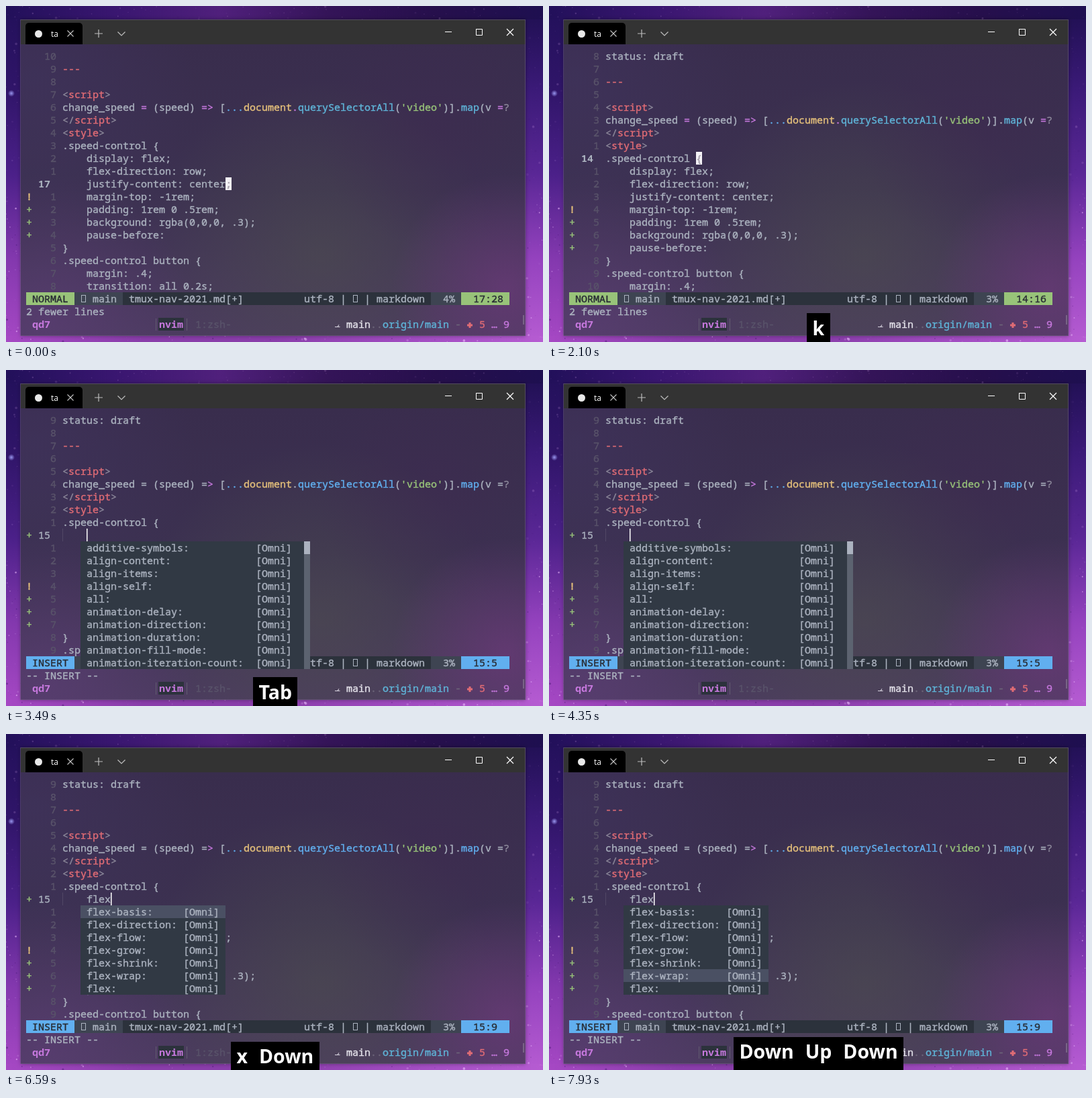
These frames come from a looping animation (800x500 px, 8 s). An HTML page with a canvas:

```html
<!DOCTYPE html>
<html lang="en">
<head>
<meta charset="utf-8">
<title>Editor completion menu</title>
<style>
  html, body { margin: 0; width: 100%; height: 100%; overflow: hidden; background: #3a1d66; }
  canvas { display: block; width: 800px; height: 500px; }
</style>
</head>
<body>
<canvas id="stage" width="800" height="500"></canvas>
<script>
const LOOP = 8000, CW = 9, CH = 19, X0 = 30, Y0 = 65;
const MONO = '"Noto Sans Mono", "DejaVu Sans Mono", monospace';
const KEYS = 'bold 28.5px "Noto Sans", "Open Sans", sans-serif';
const C = {
  fg: '#abb2bf', dim: '#59536a', punct: '#8b8799', red: '#e06c75', green: '#98c379',
  yellow: '#e5c07b', blue: '#61afef', cyan: '#5fb4d8', purple: '#c678dd',
  bar: '#2c323c', seg: '#3e4452', ink: '#282c34', pum: '#313944', pick: '#4a5063'
};

const stage = document.getElementById('stage');
let g = stage.getContext('2d');

const tag = (open, name) => [['punct', open], ['red', name], ['punct', '>']];
const query = insert => [
  ['fg', 'change_speed '], [insert ? 'fg' : 'purple', '='], ['fg', ' (speed) '],
  [insert ? 'fg' : 'purple', '='], ['purple', '>'], ['fg', ' ['], ['blue', '...'],
  ['yellow', 'document'], [insert ? 'fg' : 'purple', '.'],
  [insert ? 'blue' : 'cyan', 'querySelectorAll'], ['fg', '('], ['green', "'video'"],
  ['fg', ')].'], [insert ? 'blue' : 'cyan', 'map'], ['fg', '(v '],
  [insert ? 'fg' : 'purple', '='], ['punct', '?']
];

// The file from line 6 on; a leading sign mark goes to the gutter.
const FIRST = 6;
const FILE = [
  'status: draft', '', '---', '', tag('<', 'script'), query, tag('</', 'script'), tag('<', 'style'),
  '.speed-control {', '    display: flex;', '    flex-direction: row;',
  '    justify-content: center;', '!    margin-top: -1rem;', '+    padding: 1rem 0 .5rem;',
  '+    background: rgba(0,0,0, .3);', '+    pause-before:', '}',
  '.speed-control button {', '    margin: .4;', '    transition: all 0.2s;'
];

const list = (prefix, names) => names.split(' ').map(n => prefix + n + ':');
const FLEX = [...list('flex-', 'basis direction flow grow shrink wrap'), 'flex:'];
// span: widest entry; total: number of entries
const MENU = {
  all: { span: 27, total: 100, items: list('',
    'additive-symbols align-content align-items align-self all animation-delay ' +
    'animation-direction animation-duration animation-fill-mode animation-iteration-count') },
  f: { span: 24, total: 34, items: ['fallback:', 'filter:', ...FLEX, 'float:'] },
  fl: { span: 24, total: 20, items: [...FLEX, 'float:', 'font-language-override:', 'font-variant-ligatures:'] },
  fle: { span: 24, total: 10, items: [...FLEX, ...list('font-', 'language-override variant-alternates variant-ligatures')] },
  flex: { span: 15, total: 7, items: FLEX }
};

// Each step changes only the fields it names.
const STEPS = [
  { t: 0, keys: [], top: 7, line: 17, col: 28, pct: 4, cmd: '', insert: false,
    typed: '', menu: '', sel: -1, sign: false, green: false },
  { t: 1490, keys: ['k'], cmd: 'k' },
  { t: 1560, line: 16, col: 24, cmd: '' },
  { t: 1640, cmd: 'k' },
  { t: 1710, line: 15, col: 18, pct: 3, cmd: '' },
  { t: 1790, line: 14, col: 16, top: 6 },
  { t: 2270, keys: ['k', 'o'], cmd: 'o' },
  { t: 2340, insert: true, line: 15, col: 1, cmd: '', green: true },
  { t: 2720, keys: ['o'], sign: true },
  { t: 3180, keys: [] },
  { t: 3410, keys: ['Tab'], col: 5 },
  { t: 3490, menu: 'all', green: false },
  { t: 4350, keys: [] },
  { t: 5280, keys: ['f'], typed: 'f', col: 6 },
  { t: 5360, menu: 'f' },
  { t: 5430, typed: 'fl', col: 7 },
  { t: 5510, keys: ['f', 'e'], menu: 'fl' },
  { t: 5590, typed: 'fle', col: 8, menu: 'fle' },
  { t: 5890, keys: ['f', 'e', 'x'], typed: 'flex', col: 9, menu: 'flex' },
  { t: 6210, keys: ['e', 'x'] },
  { t: 6440, keys: ['x'] },
  { t: 6590, keys: ['x', 'Down'], sel: 0 },
  { t: 6840, keys: ['Down'] },
  { t: 6990, sel: 1 },
  { t: 7140, sel: 2 },
  { t: 7310, sel: 3 },
  { t: 7460, sel: 4 },
  { t: 7630, sel: 5 },
  { t: 7700, keys: ['Down', 'Up'], sel: 4 },
  { t: 7930, keys: ['Down', 'Up', 'Down'], sel: 5 }
];

const cx = col => X0 + col * CW;
const cy = row => Y0 + row * CH;

function rect(x, y, w, h, color) {
  g.fillStyle = color;
  g.fillRect(x, y, w, h);
}
const cells = (col, row, n, color) => rect(cx(col), cy(row), n * CW, CH, color);

// A hairline outline gives the regular face a medium weight.
function text(col, row, str, color, bold = false) {
  g.font = `${bold ? 700 : 400} 15px ${MONO}`;
  g.fillStyle = g.strokeStyle = color;
  g.fillText(str, cx(col), cy(row) + 15);
  if (bold) return;
  g.lineWidth = .4;
  g.strokeText(str, cx(col), cy(row) + 15);
}

function stroke(color, width, ...lines) {
  g.strokeStyle = color;
  g.lineWidth = width;
  g.beginPath();
  for (const [x, y, ...rest] of lines) {
    g.moveTo(x, y);
    for (let i = 0; i < rest.length; i += 2) g.lineTo(rest[i], rest[i + 1]);
  }
  g.stroke();
}

function linear(x1, y1, x2, y2, ...colors) {
  const grad = g.createLinearGradient(x1, y1, x2, y2);
  colors.forEach((c, i) => grad.addColorStop(i / (colors.length - 1), c));
  return grad;
}

function glow(x, y, r, rgb, alpha) {
  const grad = g.createRadialGradient(x, y, 0, x, y, r);
  grad.addColorStop(0, `rgba(${rgb},${alpha})`);
  grad.addColorStop(1, `rgba(${rgb},0)`);
  g.fillStyle = grad;
  g.fillRect(x - r, y - r, 2 * r, 2 * r);
}

function random(seed) {
  return () => (seed = (seed * 16807) % 2147483647) / 2147483647;
}

function sky() {
  rect(0, 0, 400, 500, linear(0, 0, 0, 500, '#22105a', '#301569', '#4b2089', '#8338ae', '#a648c4'));
  rect(400, 0, 400, 500, linear(0, 0, 0, 500, '#1e0f50', '#3b1a78', '#5a2796', '#9442be', '#b65cd2'));
  rect(0, 0, 800, 20, linear(0, 0, 800, 0, '#22105a', '#391670', '#50207c', '#341458', '#260f4c', '#1e0f50'));
  rect(0, 491, 800, 9, linear(0, 0, 800, 0, '#a648c4', '#8a3dab', '#8a3dab', '#a24cc2', '#b65cd2'));
  const rnd = random(77);
  for (let i = 0; i < 2600; i++) {
    const x = rnd() * 800, y = rnd() * 500, r = .4 + rnd() * rnd() * 1.7;
    const low = y > 300 ? .8 : .2;
    g.fillStyle = rnd() < .25 ? `rgba(60,20,105,${low / 2})` : `rgba(232,180,250,${low * rnd()})`;
    g.beginPath();
    g.arc(x, y, r, 0, 7);
    g.fill();
  }
  glow(8, 130, 5, '165,165,255', .9);
}

function titleBar() {
  rect(22, 20, 752, 37, '#333333');
  g.fillStyle = '#000';
  g.beginPath();
  g.roundRect(29, 25, 85, 32, [5, 5, 0, 0]);
  g.fill();
  g.fillStyle = '#e8e8e8';
  g.beginPath();
  g.arc(48.5, 41.5, 5.5, 0, 7);
  g.fill();
  g.font = '12px "Open Sans", "Noto Sans", sans-serif';
  g.fillStyle = '#fff';
  g.fillText('ta', 67, 46);
  stroke('#c4c4c4', 1.1, [91.5, 36.5, 100.5, 45.5], [100.5, 36.5, 91.5, 45.5]);
  stroke('#bdbdbd', 1.2, [132, 41, 144, 41], [138, 35, 138, 47], [166.5, 38.5, 172, 44, 177.5, 38.5]);
  stroke('#fff', 1, [654, 38.5, 664, 38.5], [700.5, 34.5, 709.5, 34.5, 709.5, 43.5, 700.5, 43.5, 700.5, 34]);
  stroke('#fff', 1.2, [746, 34, 756, 44], [756, 34, 746, 44]);
}

function tmuxLine() {
  text(1, 21, 'qd7', C.purple, true);
  rect(227, cy(21), 38, CH, C.bar);
  text(22, 21, 'nvim', C.purple, true);
  stroke('#625b70', 1, [223.5, 465, 223.5, 483], [269.5, 465, 269.5, 483]);
  text(28, 21, '1:zsh-', C.dim);
  stroke('#d8d4e0', 1.2, [490, 477.5, 494, 477.5, 496, 474.5], [493, 477.5, 497.5, 477.5]);
  text(53, 21, 'main', '#e4e2ea');
  text(57, 21, '..', '#6d6679');
  text(59, 21, 'origin/main', C.cyan);
  text(71, 21, '-', '#6d6679');
  stroke(C.red, 3, [687, 475, 695, 475], [691, 471, 691, 479]);
  text(75, 21, '5', C.red);
  text(77, 21, '…', C.purple);
  text(79, 21, '9', C.purple);
  rect(770.5, 460, 1, 14, '#96909f');
}

function backdrop() {
  sky();
  g.save();
  g.shadowColor = 'rgba(0,0,0,.35)';
  g.shadowBlur = 6;
  rect(22, 20, 752, 471, '#3c3152');
  g.restore();
  g.save();
  g.beginPath();
  g.rect(22, 57, 752, 434);
  g.clip();
  rect(22, 57, 752, 434, linear(0, 57, 0, 491, '#392d4d', '#3c3151', '#4b3b5f'));
  glow(40, 110, 240, '66,53,98', .5);
  glow(470, 370, 260, '78,80,78', .55);
  glow(640, 180, 180, '62,42,80', .5);
  glow(745, 420, 170, '106,58,120', .75);
  glow(60, 470, 220, '96,62,122', .55);
  g.restore();
  titleBar();
  tmuxLine();
  g.strokeStyle = 'rgba(110,95,130,.55)';
  g.lineWidth = 1;
  g.strokeRect(21.5, 20.5, 752, 470);
}

function drawLine(row, number, src, s) {
  const current = number === s.line;
  let sign = '', body = typeof src === 'function' ? src(s.insert) : src;
  if (typeof body === 'string') {
    if (/^[!+]/.test(body)) {
      sign = body[0];
      body = body.slice(1);
    }
    const rule = body.startsWith(' ') && s.green;
    body = [[body === '---' ? 'red' : rule ? 'green' : 'fg', body]];
  }
  if (current && s.insert && s.sign) sign = '+';
  if (sign) text(0, row, sign, sign === '!' ? C.yellow : C.green);
  const label = String(Math.abs(number - s.line) || number);
  if (current) text(2, row, label, C.fg, !s.insert);
  else text(5 - label.length, row, label, C.dim);
  let col = 6;
  for (const [color, str] of body) {
    text(col, row, str, C[color]);
    col += str.length;
  }
}

function tofu(col) {
  g.strokeStyle = C.fg;
  g.lineWidth = 1;
  g.strokeRect(cx(col) + 1.5, cy(19) + 4.5, 6, 10);
}

function statusLine(s) {
  const accent = s.insert ? C.blue : C.green;
  cells(0, 19, 80, C.bar);
  cells(0, 19, 8, accent);
  cells(8, 19, 8, C.seg);
  cells(67, 19, 5, C.seg);
  cells(72, 19, 8, accent);
  text(1, 19, s.insert ? 'INSERT' : 'NORMAL', C.ink);
  tofu(9);
  text(11, 19, 'main', C.fg);
  text(17, 19, 'tmux-nav-2021.md[+]', C.fg);
  text(46, 19, 'utf-8 |   | markdown', C.fg);
  tofu(54);
  text(69, 19, s.pct + '%', C.fg);
  text(74, 19, s.line + ':' + s.col, C.ink);
  text(0, 20, s.insert ? '-- INSERT --' : '2 fewer lines', C.fg);
  text(69, 20, s.cmd, C.fg);
}

function popup({ items, span, total }, sel) {
  const bar = total > items.length, width = span + 9, high = items.length * CH;
  rect(cx(9), cy(10), (width + (bar ? 1 : 0)) * CW, high, C.pum);
  items.forEach((item, i) => {
    if (i === sel) cells(9, 10 + i, width, C.pick);
    text(10, 10 + i, item, C.fg);
    text(11 + span, 10 + i, '[Omni]', C.fg);
  });
  if (bar) {
    const x = cx(10 + width);
    rect(x, cy(10), CW, high, '#5c6370');
    rect(x, cy(10), CW, Math.round(high * items.length / total), C.fg);
  }
}

function keyBox(keys) {
  if (!keys.length) return;
  const gap = 17;
  g.font = KEYS;
  const sizes = keys.map(k => g.measureText(k));
  const up = Math.max(...sizes.map(m => m.actualBoundingBoxAscent));
  const down = Math.max(...sizes.map(m => m.actualBoundingBoxDescent));
  const width = Math.round(sizes.reduce((sum, m) => sum + m.width + gap, 0));
  const top = Math.min(460, Math.round(500 - up - down - 21));
  let x = Math.round(401 - width / 2);
  rect(x, top, width, 500 - top, '#000');
  g.fillStyle = '#fff';
  x += gap / 2;
  keys.forEach((k, i) => {
    g.fillText(k, x, Math.round((top + 500 + up - down) / 2));
    x += sizes[i].width + gap;
  });
}

function cursor(s) {
  const row = s.line - s.top, x = cx(5 + s.col);
  if (s.insert) {
    rect(x, cy(row), 1.5, CH, '#fff');
    return;
  }
  rect(x, cy(row), CW, CH, '#f4f2f6');
  text(5 + s.col, row, s.line === 14 ? '{' : ';', '#a29da8');
}

const still = document.createElement('canvas');
still.width = 800;
still.height = 500;

function draw(s) {
  g.drawImage(still, 0, 0);
  const file = FILE.slice();
  if (s.insert) file.splice(s.line - FIRST, 0, ' '.repeat(s.col - 1 - s.typed.length) + s.typed);
  for (let row = 0; row < 19; row++) {
    const number = s.top + row;
    drawLine(row, number, file[number - FIRST], s);
  }
  if (s.insert && s.col > 1) rect(cx(6), cy(9), 1, CH, 'rgba(120,115,135,.35)');
  statusLine(s);
  cursor(s);
  if (s.menu) popup(MENU[s.menu], s.sel);
  keyBox(s.keys);
}

const screen = g;
g = still.getContext('2d');
backdrop();
g = screen;

const start = performance.now();
let shown = -1;
function tick() {
  const t = (performance.now() - start) % LOOP;
  const past = STEPS.filter(step => step.t <= t);
  if (past.length !== shown) {
    shown = past.length;
    draw(Object.assign({}, ...past));
  }
  requestAnimationFrame(tick);
}
tick();
</script>
</body>
</html>
```
